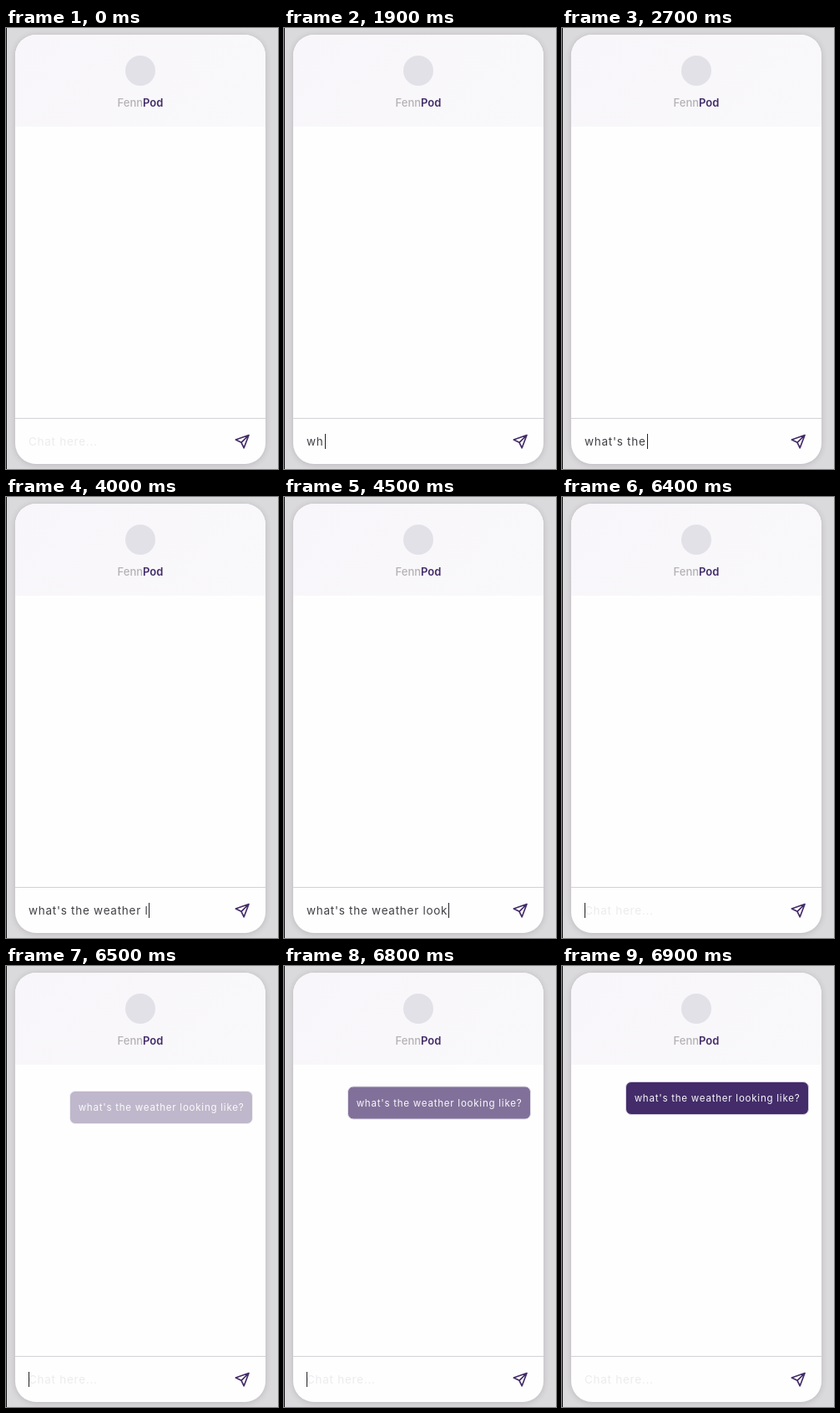
Recreate the animation shown at these times as an HTML page. Size 326x527 px, loop 8000 ms.

```html
<!DOCTYPE html>
<html lang="en">
<head>
<meta charset="utf-8">
<title>Chat widget</title>
<style>
  html, body { margin: 0; width: 100%; height: 100%; overflow: hidden; }
  body { position: relative; background: #dad9db; font: 13.5px/18px Inter, "Work Sans", sans-serif; }
  body * { position: absolute; box-sizing: border-box; }
  #edge { left: 0; top: 0; width: 1px; height: 100%; background: #141216; }
  #card, #shade { left: 11px; top: 8px; width: 300px; height: 513px; border-radius: 25px; }
  #card { overflow: hidden; background: #fefefe; }
  #shade { box-shadow: 0 1px 7px rgba(60, 50, 70, .2); }
  #head { left: 0; top: 0; width: 300px; height: 110px; background: linear-gradient(135deg, #f8f6fa, #f9f8fa); }
  #logo { left: 132px; top: 25px; width: 36px; height: 36px; border-radius: 50%; background: #e3e1e8; }
  #name { left: 0; width: 300px; top: 72px; text-align: center; font-size: 13px; font-weight: 500; color: #b5b1b5; }
  #name b { position: static; font-weight: 600; color: #432c69; }
  #rule { left: 0; top: 458px; width: 300px; height: 1px; background: #d3d2d5; }
  .input { left: 16px; top: 477px; height: 18px; letter-spacing: .73px; white-space: pre; color: #414046; }
  #hint { color: #ececee; }
  #typed { position: static; }
  #caret { left: 100%; top: 0; width: 1px; height: 18px; background: #222126; }
  #bubble { left: 65px; top: 130px; width: 220px; height: 40px; border: 1px solid #d5cfdf; border-radius: 7px;
    background: #432c69; color: #f7f5fa; font-size: 11.6px; line-height: 38px; letter-spacing: .73px;
    text-align: center; white-space: pre; }
  #send { left: 262px; top: 476px; width: 20px; height: 20px; overflow: visible; }
</style>
</head>
<body>
<div id="edge"></div>
<div id="shade"></div>
<div id="card">
  <div id="head"><div id="logo"></div><div id="name">Fenn<b>Pod</b></div></div>
  <div id="bubble"></div>
  <div id="rule"></div>
  <div id="hint" class="input">Chat here...</div>
  <div class="input"><span id="typed"></span><i id="caret"></i></div>
  <svg id="send" viewBox="273 484 20 20" fill="none" stroke="#432c69" stroke-width="1.7" stroke-linejoin="round" stroke-linecap="round">
    <path d="M291 486.5 275.3 492 282 495.3 285.2 501.8ZM291 486.5 282 495.3"/>
  </svg>
</div>
<script>
const LOOP = 8000, STEP = 100;
const FOCUS = 900, COMPLETE = 5600, SENT = 6400, SETTLED = 6900;
const TEXT = "what's the weather looking like?";
const BURSTS = { 1900: "wha", 2300: "t's ", 2600: "the", 3100: " wea", 3600: "ther", 3900: " l", 4200: "o", 4400: "ok" };
const RISE = 16.5;
const $ = id => document.getElementById(id);

// Each burst shows its first half at once and the rest one step later.
function typedAt(t) {
  if (t >= SENT) return "";
  if (t >= COMPLETE) return TEXT;
  return Object.entries(BURSTS).map(([start, part]) => {
    const steps = Math.floor((t - start) / STEP) + 1;
    return part.slice(0, Math.max(0, Math.ceil(part.length * Math.min(steps, 2) / 2)));
  }).join("");
}

$("bubble").textContent = TEXT;

function draw(now) {
  const t = now % LOOP, text = typedAt(t);
  const focused = t >= FOCUS && t < COMPLETE || t >= SENT && t < SETTLED;
  // The message appears in three equal steps.
  const shown = [SENT + STEP, SETTLED - STEP, SETTLED].filter(s => t >= s).length / 3;
  $("typed").textContent = text;
  $("hint").style.opacity = text ? 0 : 1;
  $("caret").style.opacity = focused ? 1 : 0;
  $("caret").style.marginLeft = text ? "1px" : 0;
  $("bubble").style.opacity = shown;
  $("bubble").style.transform = `translateY(${RISE * (1 - shown)}px)`;
  requestAnimationFrame(draw);
}
draw(performance.now());
</script>
</body>
</html>
```
